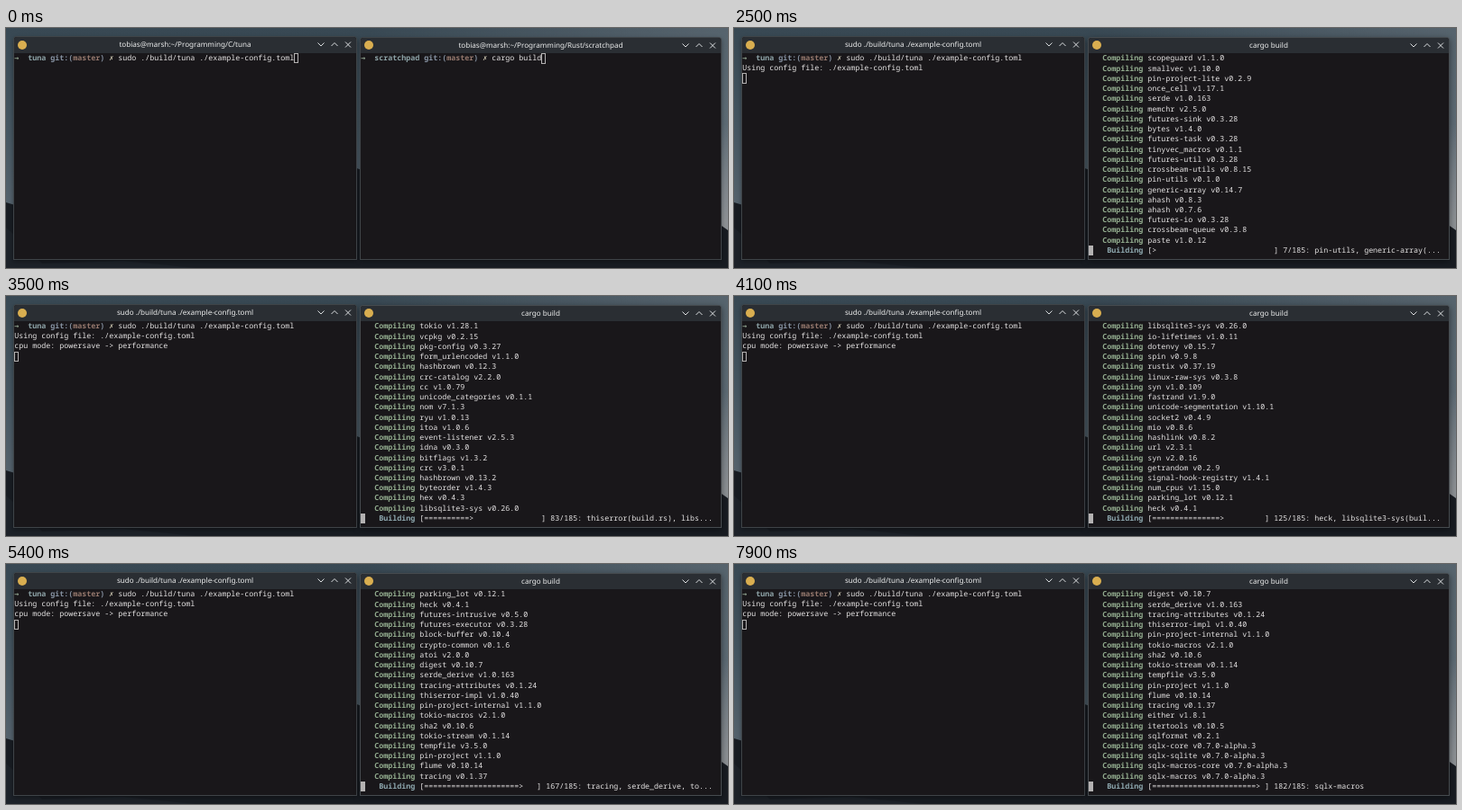
Recreate the animation shown at these times as an HTML page. Size 800 by 267 pixels, loop 8000 ms.

```html
<!DOCTYPE html>
<html lang="en">
<head>
<meta charset="utf-8">
<title>Two terminals</title>
<style>
  html, body { margin: 0; width: 100%; height: 100%; overflow: hidden; background: #15191f; }
  #stage { position: relative; width: 800px; height: 267px; overflow: hidden; text-rendering: geometricPrecision; }
  #sky { position: absolute; inset: 0; }
  .win {
    position: absolute; background: #19171a; border-radius: 3px 3px 0 0;
    box-shadow: 0 0 0 1px #3f4448, 0 2px 5px 1px rgba(0, 0, 0, .35);
  }
  .win.focus { box-shadow: 0 0 0 1px #464b4f, 0 2px 7px 1px rgba(0, 0, 0, .45); }
  .bar { position: absolute; left: 0; right: 0; top: 0; height: 17.5px; background: #2a2e33; border-radius: 3px 3px 0 0; }
  .title {
    position: absolute; left: 0; right: 0; top: 0; text-align: center; color: #eceded;
    font: 8.1px/17px "Noto Sans", sans-serif; white-space: pre;
  }
  .icon { position: absolute; left: 4px; top: 3.5px; width: 10px; height: 10px; border-radius: 50%; background: #d9ae50; }
  .buttons { position: absolute; right: 4px; top: 3px; width: 40px; height: 11px; }
  .screen { position: absolute; left: .3px; top: 17.9px; }
  .row {
    position: absolute; left: 0; white-space: pre; color: #e6e4e4;
    font: 8.3333px/11.2px "Noto Sans Mono", "DejaVu Sans Mono", monospace; font-variant-ligatures: none;
  }
  .row b { font-weight: 700; }
  .sym { font-family: "DejaVu Sans Mono", monospace; }
  .arrow { color: #93a692; }
  .dir { color: #8fa5a9; }
  .git { color: #8793a3; }
  .branch { color: #96796e; }
  .cross { color: #cfc8b2; }
  .green { color: #93ad8f; }
  .cyan { color: #8fa9b0; }
  .cursor { position: absolute; box-sizing: border-box; width: 5px; height: 11.5px; border: 1px solid #b4b2b2; }
  .cursor.solid { background: #b4b2b2; }
</style>
</head>
<body>
<div id="stage">
  <svg id="sky" width="800" height="267">
    <defs>
      <linearGradient id="air" x2="0" y2="1">
        <stop offset="0" stop-color="#384853"/>
        <stop offset=".4" stop-color="#455661"/>
        <stop offset=".8" stop-color="#58656f"/>
      </linearGradient>
      <linearGradient id="glow">
        <stop offset=".5" stop-color="#7b858d" stop-opacity="0"/>
        <stop offset="1" stop-color="#7b858d" stop-opacity=".45"/>
      </linearGradient>
      <linearGradient id="haze" x2="0" y2="1">
        <stop offset=".4" stop-color="#8c9094" stop-opacity="0"/>
        <stop offset=".8" stop-color="#8c9094"/>
      </linearGradient>
    </defs>
    <rect width="800" height="267" fill="url(#air)"/>
    <rect width="800" height="267" fill="url(#glow)"/>
    <rect x="780" width="20" height="267" fill="url(#haze)"/>
    <path d="M0 194L10 197L60 205L386 155L394 158L600 205L790 218L800 225V267H0Z" fill="#181c22"/>
    <path d="M0 222L9 230L40 262L130 259L210 267H0Z" fill="#1d2229"/>
  </svg>
</div>
<script>
const LOOP = 8000, STEP = 100, ROW = 11.24, COL = 5, ROWS = 20, COLS = 78, TOTAL = 185;

const crates = `libc 0.2.144,proc-macro2 1.0.58,quote 1.0.27,unicode-ident 1.0.8,autocfg 1.1.0,version_check 0.9.4,
cfg-if 1.0.0,futures-core 0.3.28,typenum 1.16.0,
scopeguard 1.1.0,smallvec 1.10.0,pin-project-lite 0.2.9,once_cell 1.17.1,serde 1.0.163,memchr 2.5.0,futures-sink 0.3.28,
bytes 1.4.0,futures-task 0.3.28,tinyvec_macros 0.1.1,futures-util 0.3.28,crossbeam-utils 0.8.15,pin-utils 0.1.0,
generic-array 0.14.7,ahash 0.8.3,ahash 0.7.6,futures-io 0.3.28,crossbeam-queue 0.3.8,paste 1.0.12,
tinyvec 1.6.0,lock_api 0.4.9,log 0.4.17,slab 0.4.8,subtle 2.4.1,futures-channel 0.3.28,percent-encoding 2.3.0,
unicode-bidi 0.3.13,minimal-lexical 0.2.1,parking_lot_core 0.9.7,unicode-normalization 0.1.22,tracing-core 0.1.31,
lazy_static 1.4.0,cpufeatures 0.2.7,indexmap 1.9.3,thiserror 1.0.40,base64 0.21.0,stringprep 0.1.2,serde_json 1.0.96,
allocator-api2 0.2.14,
tokio 1.28.1,vcpkg 0.2.15,pkg-config 0.3.27,form_urlencoded 1.1.0,hashbrown 0.12.3,crc-catalog 2.2.0,cc 1.0.79,
unicode_categories 0.1.1,nom 7.1.3,ryu 1.0.13,itoa 1.0.6,event-listener 2.5.3,idna 0.3.0,bitflags 1.3.2,crc 3.0.1,
hashbrown 0.13.2,byteorder 1.4.3,hex 0.4.3,libsqlite3-sys 0.26.0,
io-lifetimes 1.0.11,dotenvy 0.15.7,spin 0.9.8,rustix 0.37.19,linux-raw-sys 0.3.8,syn 1.0.109,fastrand 1.9.0,
unicode-segmentation 1.10.1,socket2 0.4.9,mio 0.8.6,hashlink 0.8.2,url 2.3.1,syn 2.0.16,getrandom 0.2.9,
signal-hook-registry 1.4.1,num_cpus 1.15.0,parking_lot 0.12.1,heck 0.4.1,
futures-intrusive 0.5.0,futures-executor 0.3.28,block-buffer 0.10.4,crypto-common 0.1.6,atoi 2.0.0,digest 0.10.7,
serde_derive 1.0.163,tracing-attributes 0.1.24,thiserror-impl 1.0.40,pin-project-internal 1.1.0,tokio-macros 2.1.0,
sha2 0.10.6,tokio-stream 0.1.14,tempfile 3.5.0,pin-project 1.1.0,flume 0.10.14,tracing 0.1.37,
either 1.8.1,itertools 0.10.5,sqlformat 0.2.1,sqlx-core 0.7.0-alpha.3,
sqlx-sqlite 0.7.0-alpha.3,sqlx-macros-core 0.7.0-alpha.3,sqlx-macros 0.7.0-alpha.3`
  .split(/,\s*/).map(c => c.split(' '));

// step, units done, crates started, units running
const build = [
  [21, 0, 4],
  [25, 7, 28, 'pin-utils, generic-array(build.rs), paste'],
  [35, 83, 67, 'thiserror(build.rs), libsqlite3-sys'],
  [41, 125, 85, 'heck, libsqlite3-sys(build.rs), syn'],
  [54, 167, 102, 'tracing, serde_derive, tokio-macros'],
  [60, 173, 105],
  [66, 176, 106, 'sqlx-core, sqlx-core, sqlformat'],
  [68, 177, 106, 'sqlx-core, sqlx-core'],
  [73, 178, 106, 'sqlx-core, sqlx-core'],
  [76, 180, 107, 'sqlx-sqlite'],
  [79, 182, 109, 'sqlx-macros'],
];
const FOCUS_LEFT = 3, RUN_LEFT = 7, FOCUS_RIGHT = 13, RUN_RIGHT = 19, CPU_MODE = 27;

const tag = (cls, text) => `<b class="${cls}">${text}</b>`;
const prompt = (dir, cmd) => tag('arrow sym', '→') + '  ' + tag('dir', dir) + ' ' + tag('git', 'git:(') +
  tag('branch', 'master') + tag('git', ')') + ' <span class="cross sym">✗</span> ' + cmd;
const promptLength = (dir, cmd) => dir.length + 19 + cmd.length;

function makeWindow(left, top, width) {
  const el = document.createElement('div');
  el.className = 'win';
  el.style.cssText = `left:${left}px;top:${top}px;width:${width}px;height:${257 - top}px`;
  el.innerHTML = `<div class="bar"><div class="icon"></div><div class="title"></div>
    <svg class="buttons" fill="none" stroke="#dcdfe1" stroke-width="1">
      <path d="M1.5 3.5L5 7L8.5 3.5M16.5 7L20 3.5L23.5 7M32 2.5L38 8.5M38 2.5L32 8.5"/></svg></div>
    <div class="screen"></div>`;
  document.getElementById('stage').append(el);
  const title = el.querySelector('.title'), screen = el.querySelector('.screen');
  return (name, rows, col, row, focus) => {
    el.classList.toggle('focus', focus);
    title.textContent = name;
    screen.innerHTML = rows.map((r, i) => `<div class="row" style="top:${i * ROW}px">${r}</div>`).join('') +
      `<div class="cursor${focus ? ' solid' : ''}" style="left:${col * COL}px;top:${row * ROW}px"></div>`;
  };
}

const drawLeft = makeWindow(9, 10, 379), drawRight = makeWindow(393, 10.5, 399);
const shell = path => 'tobias@marsh:~/Programming/' + path;

function left(step) {
  const cmd = 'sudo ./build/tuna ./example-config.toml';
  const rows = [prompt('tuna', cmd)];
  const focus = step >= FOCUS_LEFT && step < FOCUS_RIGHT;
  if (step < RUN_LEFT) return drawLeft(shell('C/tuna'), rows, promptLength('tuna', cmd), 0, focus);
  if (step > RUN_LEFT) rows.push('Using config file: ./example-config.toml');
  if (step >= CPU_MODE) rows.push('cpu mode: powersave -&gt; performance');
  drawLeft(cmd, rows, 0, rows.length, focus);
}

function progress(step) {
  const i = build.findLastIndex(k => k[0] <= step);
  const a = build[i], b = build[i + 1] || a;
  const f = b === a ? 0 : (step - a[0]) / (b[0] - a[0]);
  const mix = n => Math.floor(a[n] + (b[n] - a[n]) * f);
  const started = mix(2);
  const recent = crates.slice(Math.max(0, started - 4), started).reverse().map(c => c[0]).join(', ');
  return { done: mix(1), started, running: started === a[2] && a[3] || recent };
}

function statusLine({ done, running }) {
  const width = 28 - String(done).length;
  const fill = Math.floor(width * done / TOTAL);
  const bar = (fill ? '='.repeat(fill - 1) + '>' : '').padEnd(width);
  let tail = ` [${bar}] ${done}/${TOTAL}: ${running}`;
  const room = COLS - 12;
  if (tail.length > room) tail = tail.slice(0, room - 3) + '...';
  return '    ' + tag('cyan', 'Building') + tail.replace('>', '&gt;');
}

function right(step) {
  const cmd = 'cargo build';
  let rows = [prompt('scratchpad', cmd)];
  const focus = step >= FOCUS_RIGHT;
  if (step < RUN_RIGHT) {
    return drawRight(shell('Rust/scratchpad'), rows, promptLength('scratchpad', cmd), 0, focus);
  }
  if (step < build[0][0]) return drawRight(cmd, rows, 0, 1, focus);
  const now = progress(step);
  for (const [name, version] of crates.slice(0, now.started)) {
    rows.push(`   ${tag('green', 'Compiling')} ${name} v${version}`);
  }
  rows.push(statusLine(now));
  rows = rows.slice(-ROWS);
  drawRight(cmd, rows, 0, rows.length - 1, focus);
}

let shown = -1;
const start = performance.now();
function frame() {
  const step = Math.floor((performance.now() - start) % LOOP / STEP);
  if (step !== shown) {
    shown = step;
    left(step);
    right(step);
  }
  requestAnimationFrame(frame);
}
frame();
</script>
</body>
</html>
```
